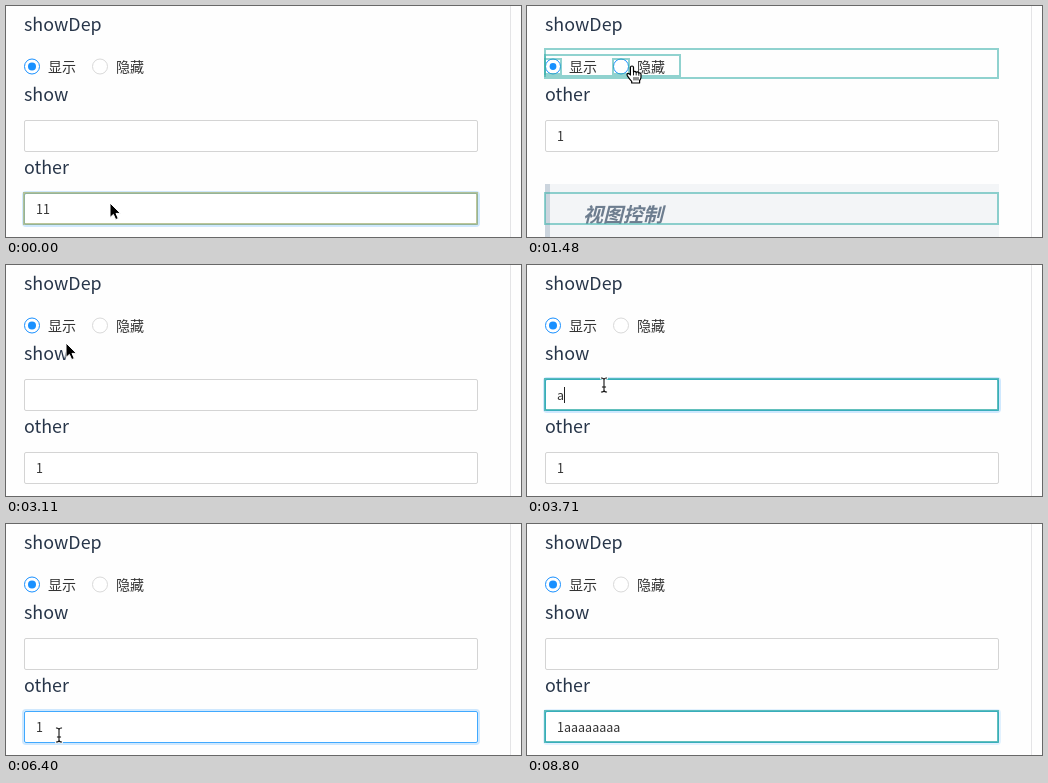
Animation, 515 px wide and 231 px high, one loop 8900 ms. Source, as an HTML page:

```html
<!DOCTYPE html>
<html lang="zh-CN">
<head>
<meta charset="utf-8">
<title>Form dependency</title>
<style>
html, body { margin: 0; width: 100%; height: 100%; overflow: hidden; background: #fefefe; }
svg { display: block; width: 515px; height: 231px; }
text { font-family: "Noto Sans CJK SC", "Noto Sans CJK", "Noto Sans", sans-serif; white-space: pre; }
.title { font-size: 17.9px; fill: #273549; }
.label { font-size: 14px; fill: #333; }
.value { font-size: 12.53px; fill: #303030; }
.quote { font-size: 20px; font-style: italic; font-weight: 600; fill: #6d7d8f; }
.box { fill: #fff; stroke: #d4d4d4; }
.glow { fill: none; stroke: #1890ff; stroke-width: 2; }
.caret { stroke: #222; }
.ring { fill: #fff; }
.dot { fill: #1890ff; }
.mark { fill: none; stroke-width: 2; }
</style>
</head>
<body>
<svg viewBox="0 0 515 231">
  <rect width="515" height="231" fill="#fefefe"/>
  <path d="M504.5 0V231" stroke="#e4e4e6"/>
  <text class="title" x="18" y="25">showDep</text>
  <g id="radios"></g>
  <g id="show"></g>
  <g id="other"></g>
  <g id="quote">
    <rect x="18" y="178" width="454" height="53" fill="#f3f5f7"/>
    <rect x="18" y="178" width="5" height="53" fill="#ccd5de"/>
    <text class="quote" x="56" y="216">视图控制</text>
  </g>
  <g id="marks"></g>
  <g id="arrow"><path d="M0 0V14.5L3.4 11.4L5.7 16.6L8.3 15.5L6 10.4H10.5Z" fill="#000" stroke="#fff" stroke-width="1"/></g>
  <g id="beam" fill="none" stroke-linecap="square">
    <path id="beamShape" d="M-2.5 -7Q0 -7 0 -5Q0 -7 2.5 -7M0 -5V5M-2.5 7Q0 7 0 5Q0 7 2.5 7M-1.5 2H1.5" stroke="#fff" stroke-width="2.4"/>
    <use href="#beamShape" style="stroke:#111"/>
    <path d="M-2.5 -7Q0 -7 0 -5Q0 -7 2.5 -7M0 -5V5M-2.5 7Q0 7 0 5Q0 7 2.5 7M-1.5 2H1.5" stroke="#111" stroke-width="1.1"/>
  </g>
  <g id="hand" stroke-linejoin="round" stroke-linecap="round">
    <path d="M-1.6 9V1.4Q-1.5 0 0 0Q1.4 0 1.5 1.4V6Q2.8 4.6 4.2 6.3Q5.6 5.2 6.8 7Q8.6 6.3 9 8.3V11.5Q8.6 13.5 7.6 14.5V17H-.3V15.3Q-2.4 13.2 -4.6 9.8Q-5.6 7.8 -4 7.4Q-2.8 7.4 -1.6 9Z" fill="#fff" stroke="#000" stroke-width="1.2"/>
    <path d="M1.5 6V9M4.2 6.5V9M6.8 7.2V9.4M2 11.5V14M4 11.5V14M6 11.5V14" fill="none" stroke="#000" stroke-width=".9"/>
  </g>
</svg>
<script>
const LOOP = 8900, NS = "http://www.w3.org/2000/svg";
const HEAT = ["#37afa9", "#63b19e", "#80b393", "#97b488", "#abb67d",
  "#beb771", "#cfb965", "#dfba57", "#efbb49", "#febc38"];
const $ = id => document.getElementById(id);

function add(parent, tag, attrs, text) {
  const el = document.createElementNS(NS, tag);
  set(el, attrs);
  if (text) el.textContent = text;
  parent.append(el);
  return el;
}
function set(el, attrs) {
  for (const k in attrs) el.setAttribute(k, attrs[k]);
}
function display(el, on) { el.style.display = on ? "" : "none"; }

function makeRadio(x, label) {
  const g = $("radios");
  const ring = add(g, "circle", { class: "ring", cx: x, cy: 60.5, r: 7.5 });
  const dot = add(g, "circle", { class: "dot", cx: x, cy: 60.5, r: 4 });
  add(g, "text", { class: "label", x: x + 16, y: 65.5 }, label);
  return { ring, dot };
}
function makeField(name, y) {
  const g = $(name);
  add(g, "text", { class: "title", x: 18, y: y - 19 }, name);
  const glow = add(g, "rect", { class: "glow", x: 17, y: y - 1, width: 456, height: 34, rx: 3 });
  const box = add(g, "rect", { class: "box", x: 18.5, y: y + .5, width: 453, height: 31, rx: 1.5 });
  const value = add(g, "text", { class: "value", x: 30, y: y + 21 });
  const caret = add(g, "path", { class: "caret" });
  return { g, glow, box, value, caret, y };
}
const radios = [makeRadio(26, "显示"), makeRadio(94, "隐藏")];
const fields = { show: makeField("show", 114), other: makeField("other", 187) };

// Highlight rectangles: x, y, width, height, opacity
const SHOW = [[18, 114, 453, 31, .78]];
const OTHER = [[18, 187, 453, 31, .78]];
const GROUP = [[18, 43, 453, 29, .55], [18, 49, 135, 21, .55],
  [18, 53, 16, 15, .55], [86, 53, 16, 15, .55]];
const HIDE = [...GROUP, [18, 187, 453, 31, .55]];
const REVEAL = [...GROUP, [18, 73, 453, 40, .55], [18, 114, 453, 31, .8]];

const as = n => "a".repeat(n);
const arrow = (x, y) => ({ cursor: ["arrow", x, y] });
const beam = (x, y) => ({ cursor: ["beam", x, y] });
const hand = (x, y) => ({ cursor: ["hand", x, y] });
const typeShow = (n, heat) => ({ show: as(n), marks: SHOW, heat, caret: 1 });
const typeOther = (n, heat) => ({ other: "1" + as(n), marks: OTHER, heat, caret: 1 });

// Each step changes some of the state and holds until the next
const steps = [
  [0, { show: "", other: "11", open: 1, dots: [4, 0], hover: -1, focus: "other",
    glow: 1, caret: 0, marks: OTHER, heat: 4, ...arrow(104, 197) }],
  [150, { other: "1", caret: 1 }],
  [300, { caret: 0 }],
  [740, { marks: [], ...beam(107, 190) }],
  [890, beam(110, 142)],
  [1040, arrow(109, 98)],
  [1190, { ...arrow(106, 74) }],
  [1340, { focus: "", hover: 1, ...hand(105, 61) }],
  [1480, { open: 0, dots: [3.4, 0], marks: HIDE, heat: 0, ...hand(105, 60) }],
  [1630, { dots: [0, 3.4], ...hand(98, 58) }],
  [1780, { dots: [0, 4], hover: 0, marks: [], ...hand(73, 54) }],
  [1930, hand(58, 54)],
  [2080, hand(47, 53)],
  [2370, { open: 1, marks: REVEAL }],
  [2520, { dots: [3.4, 0] }],
  [2670, { dots: [4, 0], marks: [] }],
  [2820, hand(51, 58)],
  [2970, { hover: -1, ...arrow(60, 78) }],
  [3120, arrow(70, 101)],
  [3260, beam(76, 118)],
  [3410, beam(77, 120)],
  [3560, { focus: "show", glow: .6, caret: 1 }],
  [3710, { glow: 1, ...typeShow(1, 0) }],
  [3860, typeShow(2, 1)],
  [4010, typeShow(3, 2)],
  [4160, typeShow(4, 3)],
  [4460, typeShow(3, 5)],
  [4610, typeShow(2, 6)],
  [4760, typeShow(1, 7)],
  [4910, typeShow(0, 8)],
  [5060, { caret: 0 }],
  [5650, arrow(55, 221)],
  [5800, { marks: [], ...arrow(56, 226) }],
  [5950, arrow(55, 222)],
  [6100, beam(54, 214)],
  [6250, { focus: "other", glow: .4, ...beam(53, 211) }],
  [6400, { glow: 1 }],
  [6550, { caret: 1 }],
  [6700, typeOther(1, 0)],
  [6850, typeOther(2, 1)],
  [7000, typeOther(4, 3)],
  [7300, typeOther(6, 4)],
  [7450, typeOther(7, 5)],
  [7600, typeOther(8, 6)],
  [8050, { marks: [], caret: 0, cursor: ["", 0, 0] }],
  [8200, { glow: .5 }],
  [8350, { focus: "" }],
  [8650, { focus: "other", glow: .4, marks: OTHER, heat: 0 }],
  [8800, { glow: .6 }]
];

function stateAt(t) {
  const s = {};
  for (const [at, change] of steps) if (at <= t) Object.assign(s, change);
  return s;
}

function drawField(name, s) {
  const f = fields[name], on = s.focus === name;
  f.value.textContent = s[name];
  display(f.glow, on);
  set(f.glow, { opacity: .2 * s.glow });
  f.box.style.stroke = on ? "#40a9ff" : "";
  const x = Math.floor(30 + (s[name] ? f.value.getComputedTextLength() : 0)) + .5;
  set(f.caret, { d: `M${x} ${f.y + 8}V${f.y + 24}` });
  display(f.caret, on && s.caret);
}

function draw(t) {
  const s = stateAt(t);
  radios.forEach((r, i) => {
    set(r.dot, { r: s.dots[i] });
    set(r.ring, { stroke: s.dots[i] || s.hover === i ? "#1890ff" : "#d9d9d9" });
  });
  drawField("show", s);
  drawField("other", s);
  display(fields.show.g, s.open);
  display($("quote"), !s.open);
  set(fields.other.g, { transform: `translate(0 ${s.open ? 0 : -73})` });

  $("marks").replaceChildren();
  for (const [x, y, width, height, opacity] of s.marks)
    add($("marks"), "rect", { class: "mark", x, y, width, height, opacity, stroke: HEAT[s.heat] });

  const [kind, cx, cy] = s.cursor;
  for (const id of ["arrow", "beam", "hand"]) {
    display($(id), id === kind);
    set($(id), { transform: `translate(${cx} ${cy})` });
  }
}

const start = performance.now();
let last = null;
function tick() {
  const t = (performance.now() - start) % LOOP;
  const index = steps.filter(([at]) => at <= t).length;
  if (index !== last) draw(t);
  last = index;
  requestAnimationFrame(tick);
}
tick();
</script>
</body>
</html>
```
